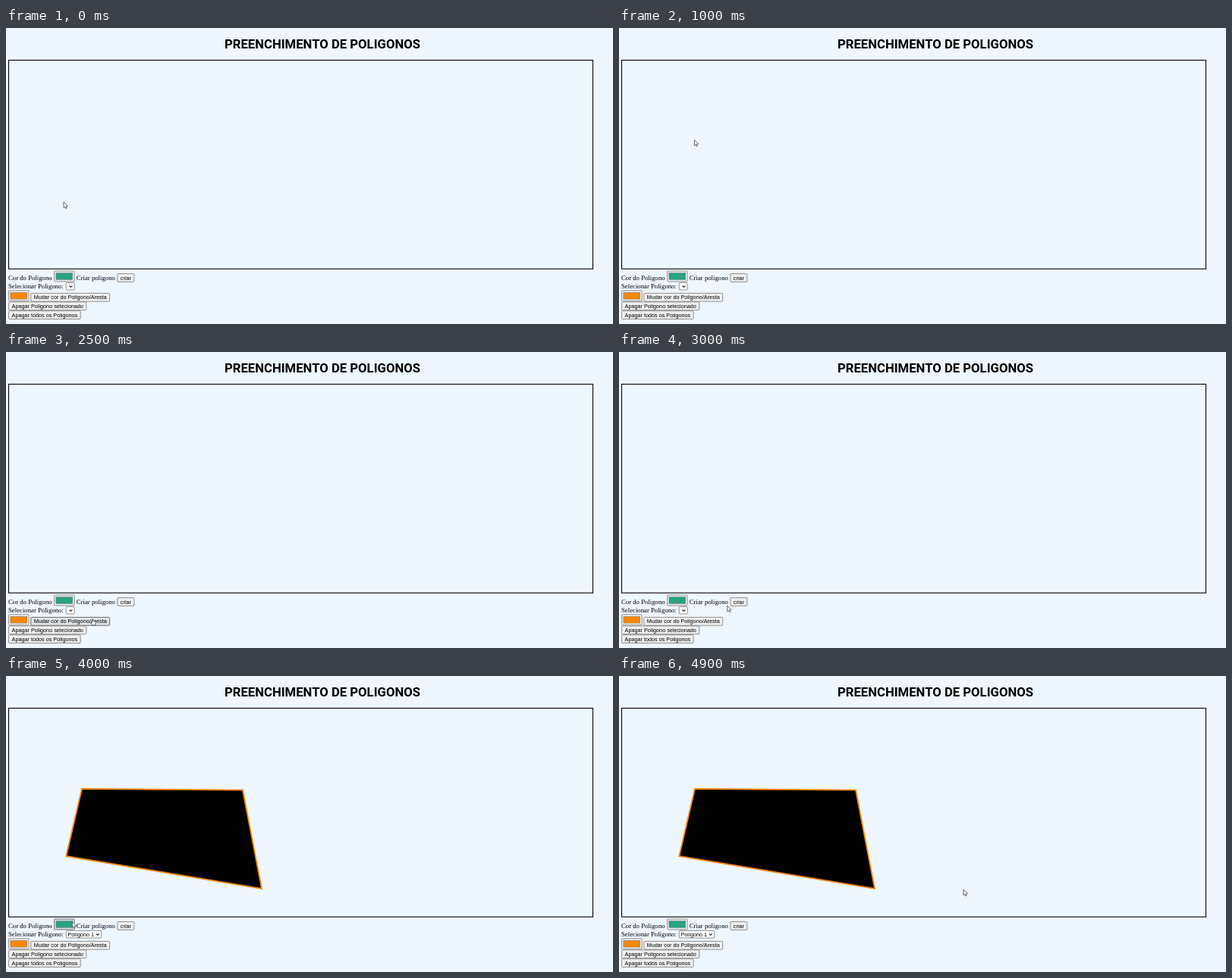
Write an HTML page with a canvas that moves like this. It is 800x391 px and loops after 5 s.

```html
<!DOCTYPE html>
<html lang="pt">
<head>
<meta charset="utf-8">
<title>Preenchimento de poligonos</title>
<style>
  html, body { margin: 0; width: 100%; height: 100%; overflow: hidden; background: #eef6fe; }
  canvas { display: block; width: 800px; height: 391px; }
</style>
</head>
<body>
<canvas id="stage" width="800" height="391"></canvas>
<script>
const ctx = document.getElementById('stage').getContext('2d');
const LOOP = 5000, STEP = 100, DWELL = 100;
const ZOOM = 0.545; // the page is shown zoomed out
const LEFT = 3.2, ROW = 11.8;
const TITLE = '700 16.7px Roboto, sans-serif';
const SERIF = `${16 * ZOOM}px "Liberation Serif", serif`;
const SANS = `${13.333 * ZOOM}px "Liberation Sans", sans-serif`;
const ORANGE = '#f58806', TEAL = '#28a283';

// Places the pointer visits, with arrival times
const stop = (time, x, y) => ({ time, x, y });
const corners = [stop(300, 79.3, 238), stop(1000, 100, 149), stop(1350, 312, 150.7), stop(1700, 337, 281)];
const create = stop(3200, 153.6, 330.2);
const stops = [
  stop(0, 76.6, 231), ...corners, stop(2500, 114, 353.6), create,
  stop(4000, 88, 325.8), stop(4500, 498, 266), stop(4800, 454.6, 283.2)
];

function pointerAt(t) {
  const next = stops.findIndex(s => s.time > t);
  if (next < 0) return stops[stops.length - 1];
  const a = stops[next - 1], b = stops[next], start = a.time + DWELL;
  const u = Math.max(0, (t - start) / (b.time - start));
  const k = u * u * (3 - 2 * u);
  return { x: a.x + (b.x - a.x) * k, y: a.y + (b.y - a.y) * k };
}

const inside = (p, x, y, w, h) => p.x >= x && p.x <= x + w && p.y >= y && p.y <= y + h;

function text(str, x, y, font, align = 'left') {
  ctx.font = font;
  ctx.textAlign = align;
  ctx.fillStyle = '#000';
  ctx.fillText(str, x, y);
}

function paint(shape, fill, stroke, width = 0.8) {
  ctx.fillStyle = fill;
  ctx.fill(shape);
  ctx.strokeStyle = stroke;
  ctx.lineWidth = width;
  ctx.stroke(shape);
}

function box(x, y, w, h, fill, stroke) {
  const shape = new Path2D();
  shape.roundRect(x + 0.4, y + 0.4, w - 0.8, h - 0.8, 1);
  paint(shape, fill, stroke);
}

// Grey control that darkens under the pointer; returns whether it is hovered
function control(p, x, y, w, h) {
  const hot = inside(p, x, y, w, h);
  box(x, y, w, h, hot ? '#e2e3e6' : '#efefef', hot ? '#4f4f4f' : '#767676');
  return hot;
}

function button(p, label, x, y) {
  ctx.font = SANS;
  const w = ctx.measureText(label).width + 16 * ZOOM;
  const hot = control(p, x, y, w, 21.3 * ZOOM);
  text(label, x + w / 2, y + 8.3, SANS, 'center');
  return hot;
}

function swatch(p, color, x, y) {
  const w = 50 * ZOOM, h = 27 * ZOOM;
  control(p, x, y, w, h);
  ctx.fillStyle = color;
  ctx.fillRect(x + 2.7, y + 3, w - 5.4, h - 6);
  ctx.strokeStyle = '#777';
  ctx.lineWidth = ZOOM;
  ctx.strokeRect(x + 2.7, y + 3, w - 5.4, h - 6);
}

function select(label, x, y) {
  const w = label ? 47.2 : 11.8, mid = x + w - 5.2;
  box(x, y, w, 10.4, '#fff', '#767676');
  text(label, x + 2.6, y + 7.8, SANS);
  ctx.strokeStyle = '#111';
  ctx.lineWidth = 1.1;
  ctx.stroke(new Path2D(`M${mid - 2} ${y + 4.3}l2 2 2-2`));
}

const arrow = new Path2D('M0 0V7.6L1.7 6.2 2.8 8.7 4.1 8.1 3 5.7 5.2 5.5Z');
const hand = new Path2D('M0 1a.7.7 0 0 1 1.4 0V3.2L4.6 4V6.5L3.8 8.6H.8L-1.6 5.4 0 5Z');

function drawPointer(p, overButton) {
  ctx.save();
  ctx.translate(p.x - 0.6, p.y - 1.2);
  paint(overButton ? hand : arrow, '#fff', '#41454c');
  ctx.restore();
}

function drawControls(p, created) {
  const top = 324.2, second = 350;
  text('Cor do Poligono', 3, 332.8, SERIF);
  swatch(p, TEAL, 63.2, 320.6);
  text('Criar poligono', 92.8, 332.8, SERIF);
  text('Selecionar Poligono:', 3, 343.9, SERIF);
  select(created ? 'Polígono 1' : '', 78.8, 336);
  swatch(p, ORANGE, LEFT, 346.4);
  return [
    button(p, 'criar', 146.5, top),
    button(p, 'Mudar cor do Poligono/Aresta', 32.4, second),
    button(p, 'Apagar Poligono selecionado', LEFT, second + ROW - 0.3),
    button(p, 'Apagar todos os Poligonos', LEFT, second + 2 * ROW - 0.3)
  ].some(Boolean);
}

function draw(t) {
  const p = pointerAt(t), created = t >= create.time;
  ctx.fillStyle = '#eef6fe';
  ctx.fillRect(0, 0, 800, 391);

  text('PREENCHIMENTO DE POLIGONOS', 417, 26.5, TITLE, 'center');
  ctx.strokeStyle = '#000';
  ctx.lineWidth = 2 * ZOOM;
  ctx.strokeRect(3.5, 42.5, 770, 275.7);
  if (created) {
    const outline = corners.map(c => `${c.x} ${c.y}`).join('L');
    paint(new Path2D(`M${outline}Z`), '#000', ORANGE, 1.8);
  }
  drawPointer(p, drawControls(p, created));
}

function tick() {
  const t = performance.now() % LOOP;
  draw(Math.floor(t / STEP) * STEP);
  requestAnimationFrame(tick);
}
tick();
</script>
</body>
</html>
```
